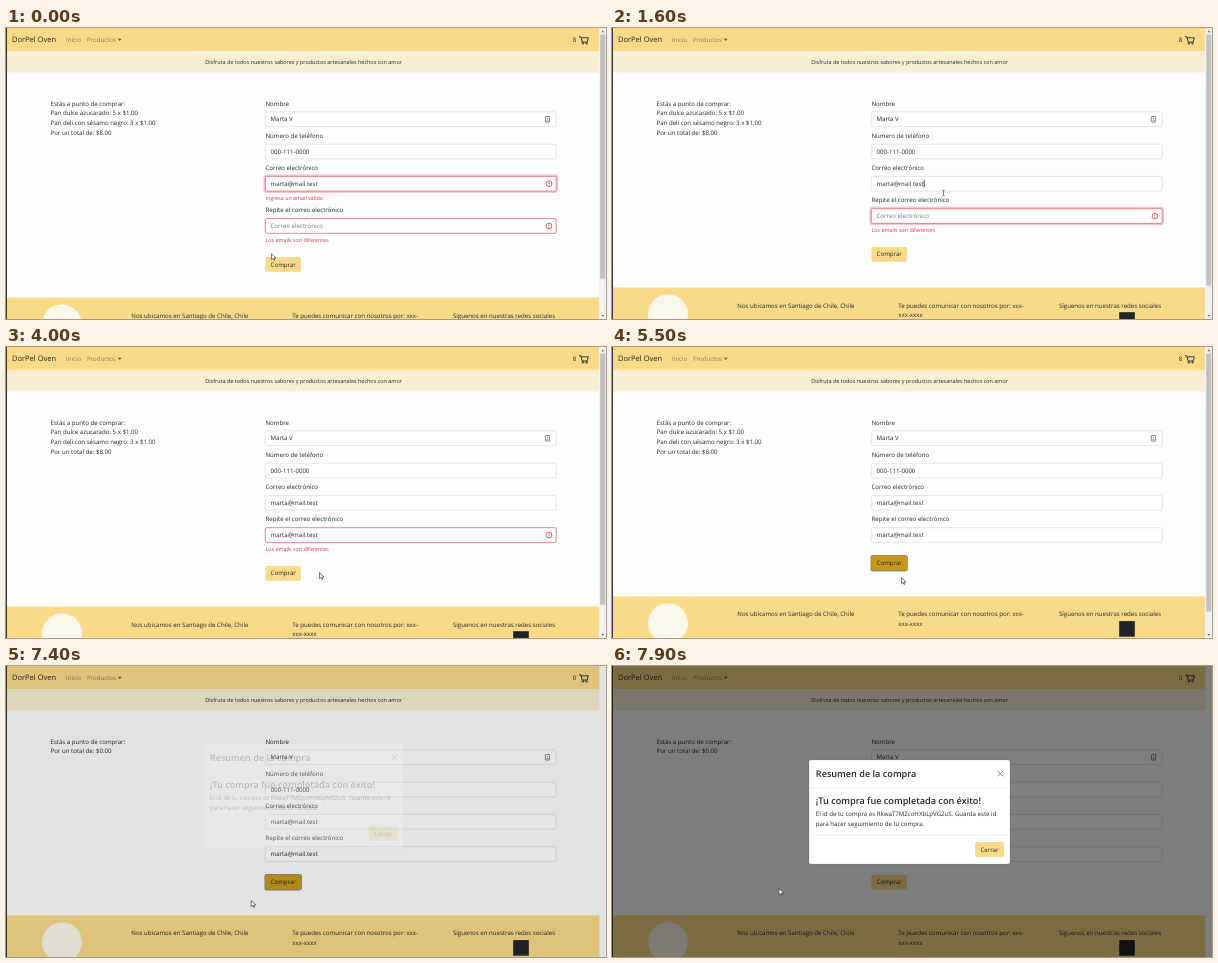
An HTML page for the animation above (8 s loop, 600 by 291 pixels).

```html
<!DOCTYPE html>
<html lang="es">
<head>
<meta charset="utf-8">
<title>Formulario de compra</title>
<style>
  html, body { margin: 0; width: 100%; height: 100%; overflow: hidden; background: #fdfdfd; }
  svg { display: block; width: 100%; height: 100%; }
  text { font: 6.12px "Open Sans", "Noto Sans", sans-serif; fill: #212529; white-space: pre; text-rendering: geometricPrecision; }
  .small { font-size: 5.46px; }
  .brand { font-size: 7.5px; }
  .title { font-size: 9.15px; font-weight: 600; }
  .muted { fill: #84795a; }
  .error { font-size: 5.35px; fill: #dc3545; }
  .field { fill: #fff; stroke: #ced4da; stroke-width: .6; }
  .field.bad { stroke: #dc3545; }
  .glow { fill: none; stroke: #dc3545; stroke-opacity: .28; stroke-width: 1.7; }
</style>
</head>
<body>
<svg id="stage" viewBox="0 0 600 291" xmlns="http://www.w3.org/2000/svg"></svg>
<script>
const LOOP = 8000, STEP = 100, ROW = 9.9;
const EDGE = 593.4; // where the page ends and the scrollbar begins
const EMAIL = "marta@mail.test";
const YELLOW = "#f9da89", PAGE = "#fdfdfd";

// Moments of the interaction, in ms
const EMAIL_OK = 500, CARET_ON = 1300, CARET_OFF = 1800;
const TYPE_FROM = 2100, TYPE_TO = 3400, BLUR = 3800;
const SUBMIT = 5000, MODAL = 7368;

// time, x, y
const PATH = [
  [0, 265.5, 225.5], [400, 265.5, 225.5], [900, 292, 190], [1300, 317, 156],
  [1600, 331.5, 165], [2000, 331, 188], [3500, 331, 188], [3800, 318, 220],
  [4000, 313.5, 225.5], [4500, 292, 224], [4700, 285, 222], [5100, 285, 223],
  [5500, 289.5, 230.5], [6300, 264, 238], [6900, 243, 240], [7300, 255.5, 237],
  [7500, 235, 232], [7900, 167, 222.5]
];

const text = (x, y, s, cls = "", extra = "") =>
  `<text x="${x}" y="${y + 2.1}" class="${cls}" ${extra}>${s}</text>`;
const rect = (x, y, w, h, fill, extra = "") =>
  `<rect x="${x}" y="${y}" width="${w}" height="${h}" fill="${fill}" ${extra}/>`;
const field = (y, id) =>
  `<rect id="${id}" class="field" x="259.3" y="${y}" width="290.9" height="14.7" rx="1.5"/>`;
const glow = (y, id) =>
  `<rect id="${id}" class="glow" x="258.3" y="${y - 1}" width="292.9" height="16.7" rx="2.3"/>`;
const caret = (id, y) => rect(0, y - 3.7, .8, 7.4, "#222", `id="${id}"`);
const alertIcon = (id, y) => `<g id="${id}" fill="none" stroke="#dc3545" stroke-width=".8">
  <circle cx="543" cy="${y}" r="2.9"/><path d="M543 ${y - 1.6}v1.9m0 .6v.8"/></g>`;

const header = rect(0, 0, EDGE, 23, YELLOW) + rect(0, 23, EDGE, 21.5, "#f8eed3") +
  text(6, 12.2, "DorPel Oven", "brand") +
  text(60, 12, "Inicio", "muted") + text(81, 12, "Productos", "muted") +
  `<path d="M111.7 10.7h4l-2 2.2z" fill="#5d563f"/>` +
  text(566.8, 12, "8", "", 'id="count"') +
  `<g fill="none" stroke="#212529" stroke-width=".9" stroke-linejoin="round">
    <path d="M573 8.7h1.7l1.5 5.3h5l1.1-4.2h-7.2"/>
    <circle cx="576.9" cy="15.4" r=".8"/><circle cx="580.6" cy="15.4" r=".8"/></g>` +
  text(297.6, 33.8, "Disfruta de todos nuestros sabores y productos artesanales hechos con amor",
    "small", 'text-anchor="middle"');

const summary = text(44.5, 75.5, "Estás a punto de comprar:") +
  `<g id="items">${text(44.5, 85.2, "Pan dulce azucarado: 5 x $1.00")}
   ${text(44.5, 94.8, "Pan deli con sésamo negro: 3 x $1.00")}</g>` +
  text(44.5, 104.5, "Por un total de: $8.00", "", 'id="total"');

const form = text(259.5, 75.5, "Nombre") + field(83.9, "name") + text(264.5, 91.3, "Marta V") +
  `<g fill="none" stroke="#555" stroke-width=".7"><rect x="539.4" y="88.5" width="4.2" height="5.6" rx=".5"/>
   <path d="M540.3 93q1.2-1.5 2.4 0M541.5 90v1.2"/></g>` +
  text(259.5, 107.8, "Número de teléfono") + field(116.2, "phone") + text(264.5, 123.7, "000-111-0000") +
  text(259.5, 140.2, "Correo electrónico") + glow(148.4, "mailGlow") + field(148.4, "mail") +
  text(264.5, 155.9, EMAIL, "", 'id="mailText"') + caret("mailCaret", 155.7) +
  alertIcon("mailIcon", 155.8) + text(259.5, 169.5, "Ingresa un email válido", "error", 'id="mailError"');

const repeat = `<g id="repeat">` + text(259.5, 182.2, "Repite el correo electrónico") +
  glow(190.6, "againGlow") + field(190.6, "again") +
  text(264.5, 198.2, "", "", 'id="againText"') + caret("againCaret", 198) +
  alertIcon("againIcon", 198) + text(259.5, 211.7, "Los emails son diferentes", "error", 'id="againError"') + `</g>`;

const buy = `<g id="buy">` +
  `<rect id="buyRing" x="258.5" y="228.1" width="37.4" height="16.6" rx="2.3" fill="#8e8a82"/>` +
  rect(259.4, 229, 35.6, 14.8, YELLOW, 'id="buyFace" rx="1.6"') + text(264.6, 236.5, "Comprar") + `</g>`;

// Drawn with its top edge at 0
const footer = `<g id="footer">` + rect(0, 0, EDGE, 80, YELLOW) +
  `<circle cx="56" cy="26.8" r="20" fill="#fbf7ea"/>` +
  text(125.3, 18, "Nos ubicamos en Santiago de Chile, Chile") +
  text(286.3, 18, "Te puedes comunicar con nosotros por: xxx-") + text(286.3, 27.6, "xxx-xxxx") +
  text(498, 18, "Síguenos en nuestras redes sociales", "", 'text-anchor="middle"') +
  rect(507.2, 24.7, 15.6, 15.6, "#212529") + `</g>`;

const scrollbar = `<g id="scrollbar">` + rect(EDGE, 0, 600 - EDGE, 291, "#f1f1f1") +
  rect(EDGE + .8, 6.6, 5, 250, "#c1c1c1", 'id="thumb"') +
  `<path d="M595.5 4.2h2.6l-1.3-1.7zM595.5 287h2.6l-1.3 1.7z" fill="#555"/></g>`;

const modal = `<g id="modal">` +
  rect(197, 94, 201, 104, "#fff", 'rx="1.8" stroke="#000" stroke-opacity=".25" stroke-width=".4"') +
  text(203.8, 109, "Resumen de la compra", "title") +
  `<path d="M385.8 104.9l5.2 5.2m0-5.2l-5.2 5.2" stroke="#777" stroke-width=".9" stroke-linecap="round"/>
   <path d="M197 122h201M197 169.3h201" stroke="#dee2e6" stroke-width=".5"/>` +
  text(203.8, 135.5, "¡Tu compra fue completada con éxito!", "title") +
  text(203.8, 148.2, "El id de tu compra es RkwaT7MZcoHXbLpVG2uS. Guarda este id") +
  text(203.8, 157.8, "para hacer seguimiento de tu compra.") +
  rect(363, 176, 29, 15, YELLOW, 'rx="1.6"') +
  text(377.5, 183.8, "Cerrar", "", 'text-anchor="middle"') + `</g>`;

const pointer = `<g id="pointer">
  <path id="arrow" d="M0 0v6.2l1.5-1.3 1 2.1.9-.4-1-2.1h2z" fill="#fff" stroke="#222" stroke-width=".6"/>
  <path id="beam" d="M-1.2-2.8q1.2 0 1.2.7v4.2q0 .7-1.2.7M1.2-2.8q-1.2 0-1.2.7m0 4.2q0 .7 1.2.7"
    fill="none" stroke="#333" stroke-width=".6"/></g>`;

const stage = document.getElementById("stage");
stage.innerHTML = rect(0, 0, 600, 291, PAGE) + header + summary + form + repeat + buy + footer +
  scrollbar + rect(0, 0, 1, 291, "#2b3b45") +
  rect(0, 0, 600, 291, "#000", 'id="shade"') + modal + pointer;

const el = {};
stage.querySelectorAll("[id]").forEach(n => el[n.id] = n);

const set = (id, name, value) => el[id].setAttribute(name, value);
const show = (id, on) => set(id, "visibility", on ? "visible" : "hidden");
const shift = (id, x, y) => set(id, "transform", `translate(${x} ${y})`);
const clamp = v => Math.max(0, Math.min(1, v));

function pointAt(t) {
  const i = PATH.findIndex(p => p[0] > t);
  if (i < 0) return PATH[PATH.length - 1].slice(1);
  const [t0, x0, y0] = PATH[i - 1], [t1, x1, y1] = PATH[i];
  const k = (t - t0) / (t1 - t0);
  return [x0 + (x1 - x0) * k, y0 + (y1 - y0) * k];
}

const caretX = id => 264.7 + el[id].getComputedTextLength();

function render(t) {
  const mailBad = t < EMAIL_OK, againBad = t < SUBMIT, done = t >= MODAL;
  const rows = !mailBad + !againBad;

  ["mailGlow", "mailIcon", "mailError"].forEach(id => show(id, mailBad));
  el.mail.classList.toggle("bad", mailBad);
  show("mailCaret", t >= CARET_ON && t < CARET_OFF);
  set("mailCaret", "x", caretX("mailText"));

  const typed = Math.round(EMAIL.length * clamp((t - TYPE_FROM) / (TYPE_TO - TYPE_FROM)));
  el.againText.textContent = typed ? EMAIL.slice(0, typed) : "Correo electrónico";
  el.againText.style.fill = typed ? "" : "#6c757d";
  ["againIcon", "againError"].forEach(id => show(id, againBad));
  el.again.classList.toggle("bad", againBad);
  show("againGlow", t >= EMAIL_OK && t < BLUR);
  show("againCaret", typed > 0 && t < BLUR);
  set("againCaret", "x", caretX("againText"));

  shift("repeat", 0, mailBad ? 0 : -ROW);
  shift("buy", 0, -(ROW + .2) * rows);
  shift("footer", 0, 269.6 - (ROW + .2) * rows);
  set("thumb", "height", 244 + 7 * rows);

  const pressed = t >= SUBMIT && t < MODAL + 300;
  show("buyRing", pressed);
  set("buyFace", "fill", pressed ? "#c6981c" : YELLOW);

  show("items", !done);
  show("scrollbar", !done);
  el.count.textContent = done ? 0 : 8;
  el.total.textContent = `Por un total de: $${done ? 0 : 8}.00`;
  set("total", "y", done ? 87.3 : 106.6);

  const fade = clamp((t - MODAL) / 150);
  const left = 1 - clamp((t - MODAL) / 300);
  set("shade", "opacity", fade * .5);
  set("modal", "opacity", fade);
  show("modal", done);
  shift("modal", 0, -19.5 * left ** 1.75);

  const beam = t >= 900 && t < 3600;
  show("arrow", !beam);
  show("beam", beam);
  shift("pointer", ...pointAt(t));
}

const start = performance.now();
function tick() {
  const t = (performance.now() - start) % LOOP;
  render(Math.floor(t / STEP) * STEP);
  requestAnimationFrame(tick);
}
tick();
</script>
</body>
</html>
```
